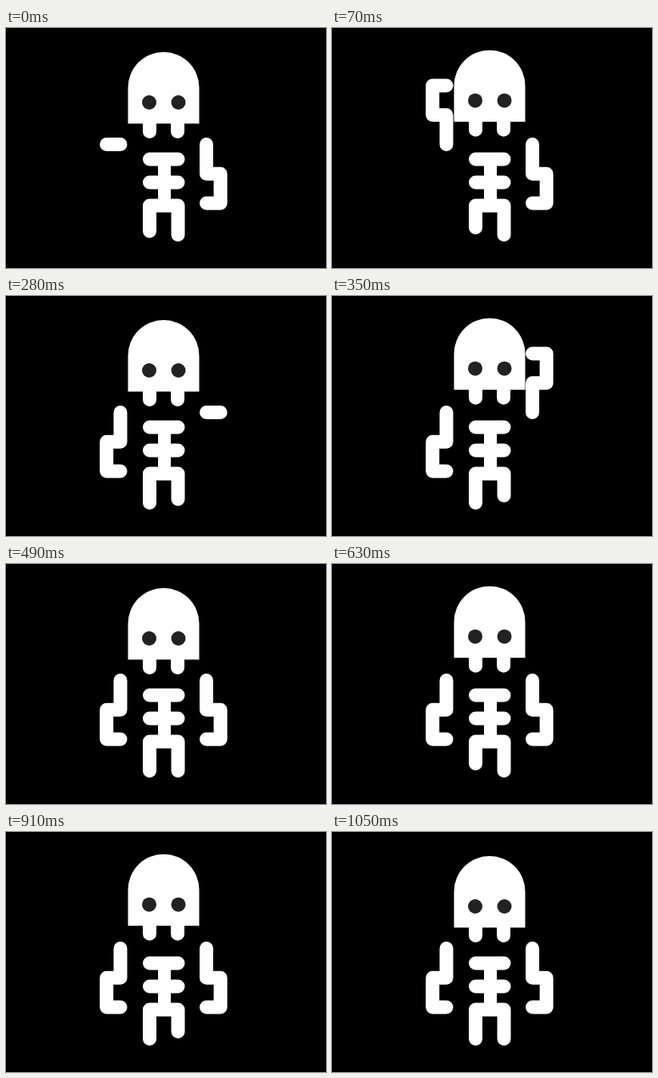
Write an HTML page that moves like this. It is 400 by 300 pixels and loops after 1.12 s.

```html
<!DOCTYPE html>
<html>
<head>
<meta charset="utf-8">
<style>
html, body { margin: 0; height: 100%; overflow: hidden; background: #000; }
svg { display: block; width: 100%; height: 100%; }
.bone { fill: none; stroke: #fff; stroke-width: 17; stroke-linecap: round; stroke-linejoin: round; }
</style>
</head>
<body>
<svg viewBox="0 0 400 300">
  <g class="bone">
    <path d="M179.5 164H215M179.5 193H215"/>
    <path d="M198 164V222" stroke-width="16"/>
    <path id="legs"/>
    <path id="leftArm"/>
    <path id="rightArm"/>
  </g>
  <g id="head">
    <path class="bone" d="M179.5 115V129.5M214.5 115V129.5"/>
    <path fill="#fff" d="M152.5 119.5V74.5a44.5 44.5 0 0 1 89 0V119.5z"/>
    <g fill="#222"><circle cx="179" cy="93" r="9"/><circle cx="215.5" cy="93" r="9"/></g>
  </g>
</svg>
<script>
const STEP = 70, STEPS = 16, STRIDE = 8;
const part = id => document.getElementById(id);

// Rises to 1 at the peak step, 0.5 one step either side of it
const lift = (step, peak) => Math.max(0, 1 - Math.abs(step - peak) / 2);

// The arm flips vertically about the shoulder
function arm(x, out, raised) {
  const y = 145.5, reach = 36.7 * (1 - 2 * raised);
  return `M${x} ${y}v${reach}h${out}v${reach}h${-out}`;
}

function draw(now) {
  const step = Math.floor(now / STEP) % STEPS;
  const stride = step % STRIDE;
  const foot = peak => 258.5 - 9 * lift(stride, peak);

  part('leftArm').setAttribute('d', arm(143, -17.3, lift(step, 1)));
  part('rightArm').setAttribute('d', arm(250.5, 17.6, lift(step, 5)));
  part('legs').setAttribute('d', `M179.5 ${foot(1)}V222H215V${foot(5)}`);
  part('head').setAttribute('transform', `translate(0 ${step % 4 === 1 ? -2.3 : 0})`);
}

const start = performance.now();
function tick() {
  draw(performance.now() - start);
  requestAnimationFrame(tick);
}
tick();
</script>
</body>
</html>
```
